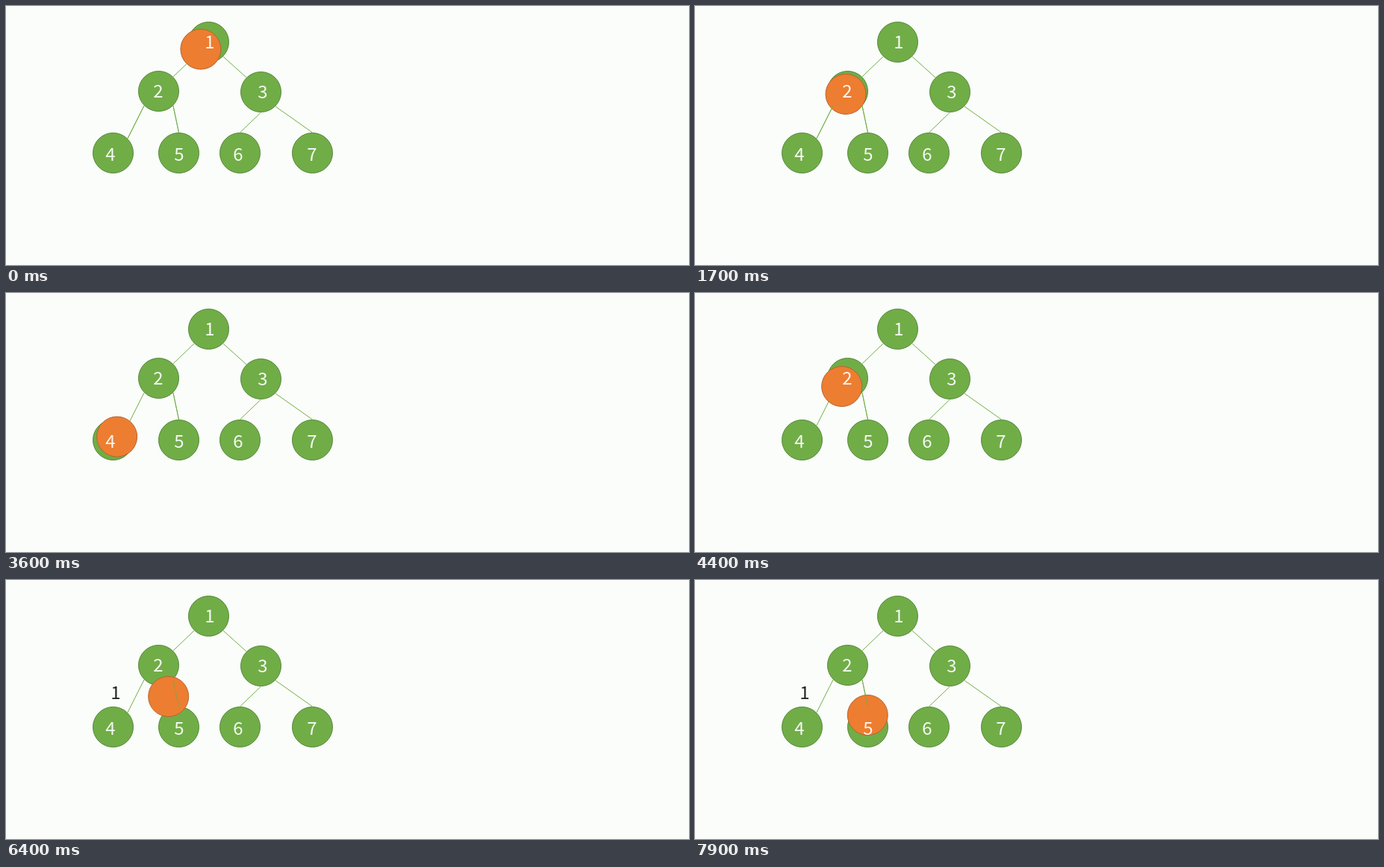
Animation of 915x348 px, one loop 8 s. Source, as an HTML page:

```html
<!DOCTYPE html>
<html lang="en">
<head>
<meta charset="utf-8">
<title>Tree walk</title>
<style>
  html, body { margin: 0; width: 100%; height: 100%; overflow: hidden; background: #fbfdfa; }
  svg { display: block; width: 915px; height: 348px; }
  .edge { stroke: #70ad47; stroke-width: 1; }
  .node { fill: #70ad47; stroke: #56893a; }
  #ball { fill: #ed7d31; stroke: #b5652f; }
  text { font: 300 24px "Noto Sans CJK SC", "Noto Sans", sans-serif; text-anchor: middle; fill: #fff; fill-opacity: 0.93; }
  #count { fill: #111; }
</style>
</head>
<body>
<svg viewBox="0 0 915 348">
  <g id="back"></g>
  <circle id="ball" r="27"/>
  <g id="front"></g>
  <text id="count" x="147" y="160">1</text>
</svg>
<script>
const LOOP = 8000, STEP = 100, TRIP = 1500, R = 27;
const $ = id => document.getElementById(id);
const back = $('back'), front = $('front'), ball = $('ball'), count = $('count');

function add(parent, tag, attrs, text = '') {
  const el = document.createElementNS('http://www.w3.org/2000/svg', tag);
  for (const k in attrs) el.setAttribute(k, attrs[k]);
  el.textContent = text;
  return parent.appendChild(el);
}

// centre and sideways shift of the label
const nodes = [
  [271.5, 48.5, 1.5], [204.5, 114.5, -0.5], [341.5, 115.5, 2.5],
  [143.5, 197.5, -3.5], [231.5, 197.5, 0.5], [313.5, 197.5, -2.5], [410.5, 197.5, -0.5]
];

// point on a node's rim, in eighths of a turn clockwise from the right
function rim(n, eighth) {
  const a = eighth * Math.PI / 4, [x, y] = nodes[n - 1];
  return [x + (R + 0.5) * Math.cos(a), y + (R + 0.5) * Math.sin(a)];
}
function edge(parent, from, out, to, into) {
  const [x1, y1] = rim(from, out), [x2, y2] = rim(to, into);
  return add(parent, 'line', { class: 'edge', x1, y1, x2, y2 });
}

edge(back, 1, 3, 2, 7);
edge(back, 1, 1, 3, 5);
edge(back, 3, 2, 6, 6);
edge(back, 3, 1, 7, 6);
edge(back, 2, 3, 4, 7);
edge(back, 2, 1, 5, 6);
const overFour = edge(front, 2, 3, 4, 7), overFive = edge(front, 2, 1, 5, 6);
overFour.style.opacity = overFive.style.opacity = 0.8;

nodes.forEach(([cx, cy, dx], i) => {
  const leaf = i > 2;
  add(back, 'circle', { class: 'node', cx, cy, r: R });
  add(front, 'text', { x: cx + dx, y: cy + (leaf ? 10.5 : 8.5) }, i + 1);
});

// places where the ball rests, and the trips between them
const two = nodes[1], four = [143, 201], five = [231, 199];
const trips = [
  { start: -410, path: [nodes[0], [204.5, 109], two] },
  { start: 1478, path: [two, [171.5, 166.5], four] },
  { start: 3279, path: [four, two] },
  { start: 5652, path: [two, five] },
  { start: 7431, path: [five, [231.5, 182], two] }
];

const ease = u => u < 0.5 ? 2 * u * u : 1 - 2 * (1 - u) ** 2;

function along(pts, f) {
  const lens = pts.slice(1).map((p, i) => Math.hypot(p[0] - pts[i][0], p[1] - pts[i][1]));
  let d = f * lens.reduce((a, b) => a + b), i = 0;
  while (i < lens.length - 1 && d > lens[i]) d -= lens[i++];
  const k = d / lens[i], a = pts[i], b = pts[i + 1];
  return [a[0] + (b[0] - a[0]) * k, a[1] + (b[1] - a[1]) * k];
}

function draw(t) {
  const now = trips.findLastIndex(trip => trip.start <= t);
  const { start, path } = trips[now];
  const [x, y] = along(path, ease(Math.min(1, (t - start) / TRIP)));
  ball.setAttribute('cx', x.toFixed(2));
  ball.setAttribute('cy', y.toFixed(2));
  count.style.visibility = t >= 5100 ? 'visible' : 'hidden';
  overFour.style.visibility = now < 2 ? 'visible' : 'hidden';
}

const t0 = performance.now();
function tick() {
  const t = (performance.now() - t0) % LOOP;
  draw(Math.floor((t + 0.01) / STEP) * STEP % LOOP);
  requestAnimationFrame(tick);
}
tick();
</script>
</body>
</html>
```
